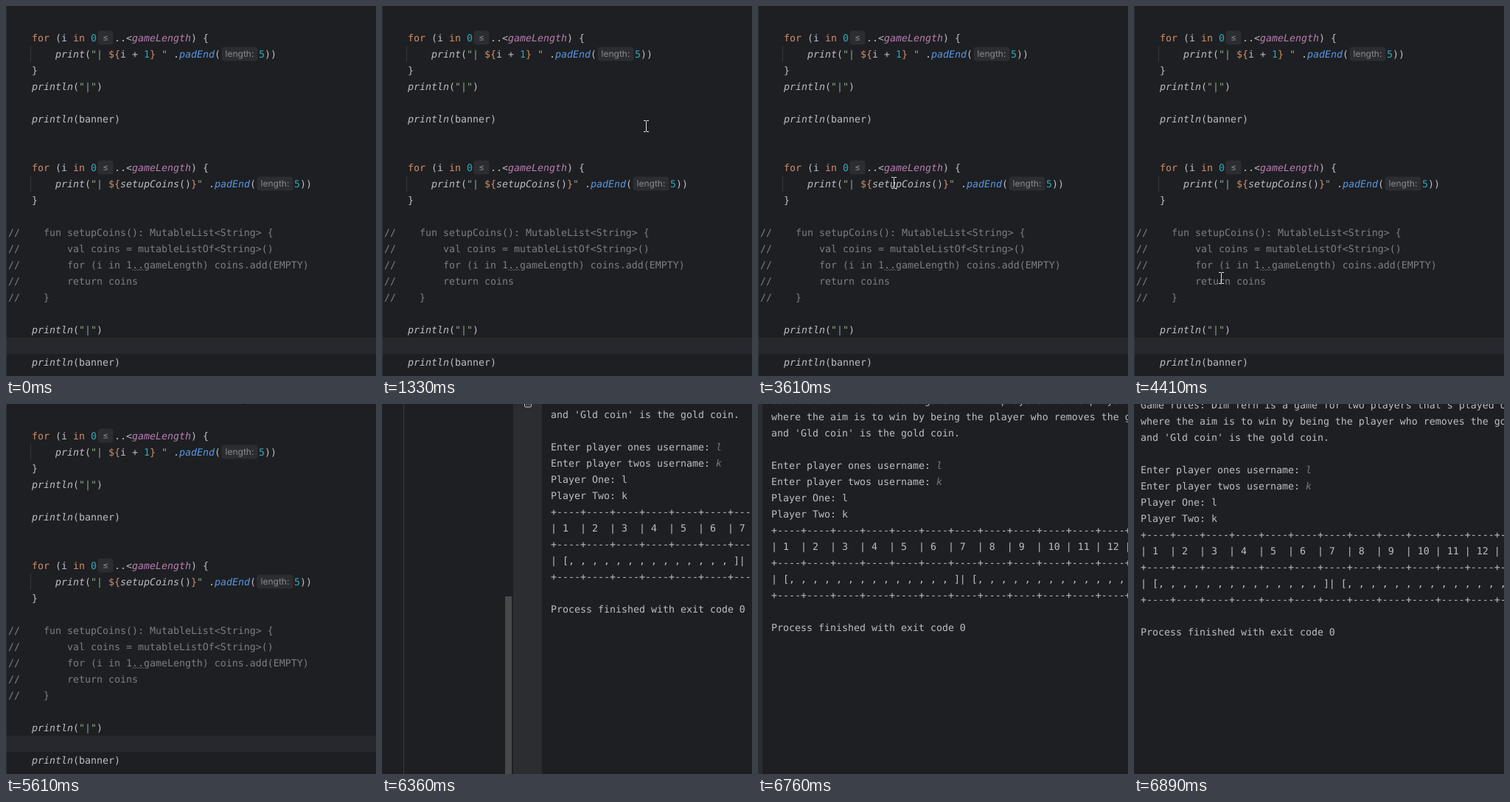
Animation, 502 px wide and 502 px high, one loop 8000 ms. Source, as an HTML page:

```html
<!DOCTYPE html>
<html lang="en">
<head>
<meta charset="utf-8">
<title>Editor and console</title>
<style>
  html, body { margin: 0; width: 100%; height: 100%; overflow: hidden; background: #1e1f22; }
  svg { display: block; width: 502px; height: 502px; }
  text { font: 13.29px "DejaVu Sans Mono", "Noto Sans Mono", monospace; white-space: pre; fill: #bcbec4; text-rendering: geometricPrecision; }
  .key { fill: #cf8e6d; }
  .num { fill: #2aacb8; }
  .str { fill: #86a883; }
  .call { font-style: italic; }
  .prop { fill: #b97db4; font-style: italic; }
  .ext { fill: #5698e6; font-style: italic; }
  .note { fill: #7a7e85; }
  .typed { fill: #74787f; font-style: italic; }
  .hint { font: 12px Inter, sans-serif; fill: #868a91; }
</style>
</head>
<body>
<svg viewBox="0 0 502 502">
  <g id="world"><g id="editor"></g><g id="run"></g></g>
  <path id="pointer" fill="#e4e4e4" shape-rendering="crispEdges" d="M-3-8h3v1h1v-1h3v1h-3v14h3v1h-3v-1h-1v1h-3v-1h3v-14h-3z"/>
  <rect id="tip" x="321" width="3" height="1" fill="#0b0b0c"/>
</svg>
<script>
const LOOP = 8000, STEP = 66.7, CELL = 8, ROW = 22;
const PAN_X = 1423, PAN_Y = 50, PAN_START = 6160, PAN_END = 6890;
const byId = id => document.getElementById(id);
const world = byId('world'), pointer = byId('pointer'), tip = byId('tip');
let layer = byId('editor');

function add(tag, attrs, text) {
  const el = document.createElementNS('http://www.w3.org/2000/svg', tag);
  for (const key in attrs) el.setAttribute(key, attrs[key]);
  if (text) el.textContent = text;
  layer.append(el);
}
const box = (x, y, width, height, fill, rx = 0) => add('rect', { x, y, width, height, fill, rx });
const column = (x, width, fill) => box(x, -100, width, 800, fill);

// Runs are [class, text]; a "hint" run is an inlay label with its own width.
function line(x, y, ...runs) {
  for (const [cls, text, width] of runs) {
    if (cls === 'hint') {
      box(x + 1.5, y - 9.5, width - 3, 19, '#2b2d30', 4);
      add('text', { class: cls, x: x + width / 2, y: y + 4, 'text-anchor': 'middle' }, text);
      x += width;
    } else {
      add('text', { class: cls, x, y: y + 5 }, text);
      x += text.length * CELL;
    }
  }
}

// Editor
column(0, 1, '#313338');
box(1, 450, 900, ROW, '#26282e');

function loop(y, ...body) {
  line(35, y, ['key', 'for'], ['', ' (i '], ['key', 'in'], ['num', ' 0'], ['hint', '≤', 24],
    ['', '..<'], ['prop', 'gameLength'], ['', ') {']);
  line(67, y + ROW, ['call', 'print'], ['', '('], ['str', '"| '], ['key', '${'], ...body,
    ['', ' .'], ['ext', 'padEnd'], ['', '('], ['hint', 'length:', 52], ['num', '5'], ['', '))']);
  line(35, y + 2 * ROW, ['', '}']);
  box(33, y + 11, 1, ROW, '#36383d');
}
const println = (y, cls, arg) => line(35, y, ['call', 'println'], ['', '('], [cls, arg], ['', ')']);

loop(43, ['', 'i + '], ['num', '1'], ['key', '}'], ['str', ' "']);
println(109, 'str', '"|"');
println(153, '', 'banner');
loop(219, ['call', 'setupCoins'], ['', '()'], ['key', '}'], ['str', '"']);
[
  '    fun setupCoins(): MutableList<String> {',
  '        val coins = mutableListOf<String>()',
  '        for (i in 1..gameLength) coins.add(EMPTY)',
  '        return coins',
  '    }'
].forEach((text, i) => line(3, 307 + i * ROW, ['note', '//' + text]));
add('path', { d: 'M171 359' + 'l2 -2l2 2'.repeat(4), fill: 'none', stroke: '#6c7076', 'stroke-width': 0.7 });
println(439, 'str', '"|"');
println(483, '', 'banner');

// Margin guide, scrollbar, tool strip and console, placed as seen after the pan
layer = byId('run');
layer.setAttribute('transform', `translate(${PAN_X} ${-PAN_Y})`);
column(-191, 1, '#393b40');
box(-53, 292, 9, 600, '#48494b');
column(-42, 39, '#2b2d30');
add('path', {
  d: 'M-27.500 24.500h11m-7.500 0v-2.500h4v2.500m-6.500 0v9q0 1.500 1.500 1.500h6q1.500 0 1.500-1.500v-9m-6 2.500v5m3-5v5',
  fill: 'none', stroke: '#ced0d6'
});

const range = (n, make) => Array.from({ length: n }, (_, i) => make(i)).join('');
const rule = range(14, () => '+----') + '+';
[
  "Game rules: Dim fern is a game for two players that's played on a",
  'where the aim is to win by being the player who removes the gold',
  "and 'Gld coin' is the gold coin.",
  '',
  ['Enter player ones username: ', 'l'],
  ['Enter player twos username: ', 'k'],
  'Player One: l',
  'Player Two: k',
  rule,
  range(14, i => ('| ' + (i + 1)).padEnd(5)) + '|',
  rule,
  range(3, () => '| [' + ', '.repeat(14) + ']') + '|',
  rule,
  '',
  'Process finished with exit code 0'
].forEach((item, i) => {
  const [text, typed = ''] = [].concat(item);
  line(9, 1 + i * ROW, ['', text], ['typed', typed]);
});

// Pointer moves: start, end, then the first, middle and last point.
const moves = [
  [990, 1600, [440, 484], [365, 190], [310, -8]],
  [2060, 2860, [310, 0], [264, 281], [249, 299]],
  [2930, 3330, [249, 299], [205, 262], [180, 243]],
  [3610, 4410, [184, 240], [160, 295], [118, 369]],
  [4550, 4670, [95, 345], [70, 312], [47, 287]],
  [4810, 5350, [60, 340], [292, 376], [324, -12]]
];

// Progress held between screen updates: index of the current step and how many there are.
function stepAt(t, start, end) {
  const last = Math.round((end - start) / STEP);
  return [Math.min(last, Math.floor((t - start + 0.5) / (end - start) * last)), last];
}

function pointerAt(t) {
  const move = moves.filter(m => m[0] <= t).pop();
  if (!move || t >= PAN_START) return [0, -50];
  const [start, end, a, mid, b] = move;
  const [k, last] = stepAt(t, start, end);
  const u = k / last;
  // Parabola through the three points
  return a.map((p, i) =>
    Math.round(p + (b[i] - p) * u + (4 * mid[i] - 2 * p - 2 * b[i]) * u * (1 - u)));
}

function panAt(t) {
  if (t < PAN_START) return [0, 0];
  const [k, last] = stepAt(t, PAN_START, PAN_END);
  const u = (k + 1) / (last + 1), decay = 5.54;
  const glide = (1 - Math.exp(-decay * u)) / (1 - Math.exp(-decay));
  return [-PAN_X * glide, PAN_Y * (1 - (1 - u) ** 1.15)].map(Math.round);
}

function draw(t) {
  world.setAttribute('transform', `translate(${panAt(t)})`);
  pointer.setAttribute('transform', `translate(${pointerAt(t)})`);
  tip.style.display = t >= 5560 && t < PAN_START ? '' : 'none';
}

const begin = performance.now();
function tick() {
  draw((performance.now() - begin) % LOOP);
  requestAnimationFrame(tick);
}
tick();
</script>
</body>
</html>
```
